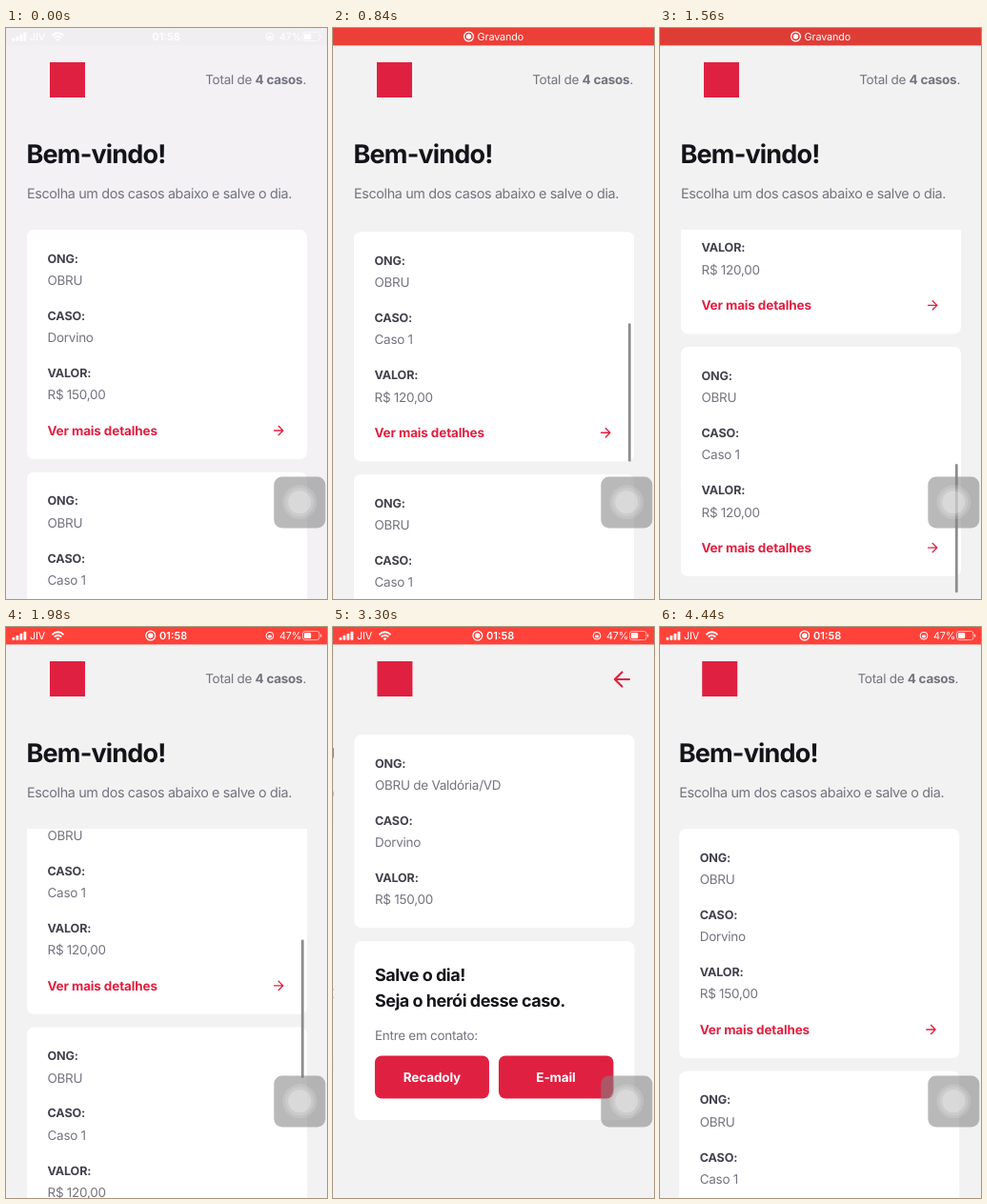
Animation of 337 by 600 pixels, one loop 4.5 s. Source, as an HTML page:

```html
<!DOCTYPE html>
<html lang="pt-BR">
<head>
<meta charset="utf-8">
<style>
  html, body { margin: 0; width: 100%; height: 100%; overflow: hidden; background: #f2f2f2; }
  svg { display: block; width: 100vw; height: 100vh; font-family: Inter, sans-serif; text-rendering: geometricPrecision; }
  text { letter-spacing: -.02em; fill: #737380; font-size: 13.5px; }
  .title { font-size: 27px; font-weight: 700; fill: #13131a; letter-spacing: -.03em; }
  .lead { font-size: 14.4px; letter-spacing: -.026em; }
  .label { font-size: 12.6px; font-weight: 700; fill: #41414d; letter-spacing: -.012em; }
  .link { font-weight: 700; fill: #e02041; letter-spacing: -.01em; }
  .hero { font-size: 18px; font-weight: 700; fill: #13131a; letter-spacing: -.028em; }
  .button { font-weight: 700; fill: #fff; text-anchor: middle; letter-spacing: -.01em; }
  .status text { font-size: 10.8px; fill: #fff; letter-spacing: -.01em; }
  .status .clock { font-size: 11px; font-weight: 600; letter-spacing: 0; }
  .arrow { fill: none; stroke: #e02041; stroke-width: 2; stroke-linecap: round; stroke-linejoin: round; }
</style>
</head>
<body>
<svg id="stage" viewBox="0 0 337 600" preserveAspectRatio="none"></svg>
<script>
const LOOP = 4500, WIDTH = 337, PITCH = 254.7, VIEW_TOP = 212, VIEW_HEIGHT = 388;
const CONTENT = 4 * PITCH, MAX_SCROLL = CONTENT - VIEW_HEIGHT;
const PUSH = 2416, POP = 3903, RATE = 7.5 / 1000;
const RECORD_AT = 180, CLOCK_AT = 1900;

const SCROLL = [[0, 0], [380, 0], [540, 65.5], [1140, 444.2], [1560, 641],
                [1700, MAX_SCROLL], [1780, MAX_SCROLL], [2170, 0], [LOOP, 0]];
const BAR_FADE = [[380, 0], [430, 1], [2190, 1], [2290, 0]];
const LINK_FADE = [[2320, 1], [2370, .2], [2480, .2], [2600, 1]];
const BACK_FADE = [[3780, 1], [3830, .2], [3920, .2], [4040, 1]];

const text = (x, y, content, cls = '', extra = '') =>
  `<text x="${x}" y="${y}" class="${cls}" ${extra}>${content}</text>`;
const box = (x, y, w, h, fill, r = 0, extra = '') =>
  `<rect x="${x}" y="${y}" width="${w}" height="${h}" rx="${r}" fill="${fill}" ${extra}/>`;
const arrow = (x, y, size, id = '') =>
  `<path id="${id}" class="arrow" transform="translate(${x} ${y}) scale(${size / 24})" d="M-7 0H7M0 -7L7 0L0 7"/>`;
const logo = box(46, 36, 37, 37, '#e02041');

const fields = (y, ong, name, value) =>
  [['ONG:', ong], ['CASO:', name], ['VALOR:', value]].map(([label, content], i) =>
    text(43.5, y + 34.6 + i * 60.2, label, 'label') + text(43.5, y + 58 + i * 60.2, content)).join('');

const listCard = i => {
  const y = VIEW_TOP + i * PITCH;
  return box(22, y, 294, 241, '#fff', 7.2) +
    fields(y, 'OBRU', i ? 'Caso 1' : 'Dorvino', i ? 'R$ 120,00' : 'R$ 150,00') +
    `<g ${i ? '' : 'id="link"'}>${text(43.5, y + 216, 'Ver mais detalhes', 'link')}${arrow(286.2, y + 211, 16)}</g>`;
};

const listPage = `<g id="list">${logo}
  ${text(315, 58.8, 'Total de <tspan font-weight="700">4 casos</tspan>.', '', 'text-anchor="end"')}
  ${text(21.5, 141.5, 'Bem-vindo!', 'title')}
  ${text(22, 178.6, 'Escolha um dos casos abaixo e salve o dia.', 'lead')}
  <g clip-path="url(#viewport)"><g id="cards">${[0, 1, 2, 3].map(listCard).join('')}</g></g>
  ${box(309.9, 0, 2.8, 0, '#8e8e90', 1.4, 'id="thumb"')}</g>`;

const detailPage = `<g id="detail">
  ${box(-6, 0, 6, 600, 'url(#shade)', 0, 'id="edge"')}${box(0, 0, WIDTH, 600, '#f2f2f2')}${logo}
  <g transform="translate(303 55) scale(-1 1)">${arrow(0, 0, 26, 'back')}</g>
  ${box(22, 113.3, 294, 202.7, '#fff', 7.2)}
  ${fields(113, 'OBRU de Valdória/VD', 'Dorvino', 'R$ 150,00')}
  ${box(22, 330, 294, 188, '#fff', 7.2)}
  ${text(43.5, 372.3, 'Salve o dia!', 'hero')}${text(43.5, 399.3, 'Seja o herói desse caso.', 'hero')}
  ${text(43.5, 433.5, 'Entre em contato:')}
  ${box(43.5, 450.5, 120, 45, '#e02041', 7.2)}${text(103.5, 478, 'Recadoly', 'button')}
  ${box(173.5, 450.5, 120.5, 45, '#e02041', 7.2)}${text(233.5, 478, 'E-mail', 'button')}</g>`;

const recordIcon = x =>
  `<circle cx="${x}" cy="9" r="4.9" fill="none" stroke="#fff" stroke-width="1.2"/><circle cx="${x}" cy="9" r="2.7" fill="#fff"/>`;

const statusBar = `<g class="status">${box(0, 0, WIDTH, 18.4, '#f00', 0, 'id="bar"')}
  <g id="recording">${recordIcon(142.5)}${text(151.5, 13, 'Gravando')}</g>
  <g id="phone">
    ${[0, 1, 2, 3].map(i => box(6.5 + i * 4, 10.8 - i * 2, 2.8, 3 + i * 2, '#fff', .8)).join('')}
    ${text(25, 13, 'JIV')}
    <g fill="none" stroke="#fff" stroke-width="1.8"><path d="M48.5 8Q54.5 2.6 60.5 8M50.7 10.4Q54.5 7 58.3 10.4"/></g>
    <path d="M52.5 12L54.5 14L56.5 12Q54.5 10.4 52.5 12" fill="#fff"/>
    <g id="dot">${recordIcon(151.8)}</g>
    ${text(0, 13, '01:58', 'clock', 'id="clock"')}
    <g fill="none" stroke="#fff"><circle cx="277" cy="9.2" r="3.9"/></g>${box(275.2, 8.4, 3.6, 2.8, '#fff', .5)}
    ${text(287, 13, '47%')}
    ${box(311.5, 4.5, 17.5, 9, 'none', 2.5, 'stroke="#fff" stroke-opacity=".6"')}
    ${box(313, 6, 7.2, 6, '#fff', 1.2)}${box(330, 7.4, 1.3, 3.2, '#fff', .6, 'opacity=".7"')}
  </g></g>`;

const touchButton = box(281.3, 471.5, 54, 54, '#828282', 8.5, 'opacity=".56"') +
  [[18, .14], [15, .16], [12, .26]].map(([r, o]) =>
    `<circle cx="308.3" cy="498.3" r="${r}" fill="#fff" opacity="${o}"/>`).join('');

const stage = document.getElementById('stage');
stage.innerHTML = `<defs>
  <clipPath id="viewport">${box(0, VIEW_TOP, WIDTH, VIEW_HEIGHT, '#fff')}</clipPath>
  <linearGradient id="shade"><stop stop-opacity="0"/><stop offset="1" stop-opacity=".08"/></linearGradient>
</defs>${box(0, 0, WIDTH, 600, '#f2f2f2', 0, 'id="page"')}${listPage}${detailPage}${statusBar}${touchButton}`;

const el = id => document.getElementById(id);
const set = (id, attributes) => Object.entries(attributes).forEach(([k, v]) => el(id).setAttribute(k, v));
const show = (id, visible) => set(id, { display: visible ? 'inline' : 'none' });

function linear(keys, t) {
  if (t <= keys[0][0]) return keys[0][1];
  for (let i = 1; i < keys.length; i++) {
    const [t0, a] = keys[i - 1], [t1, b] = keys[i];
    if (t < t1) return a + (b - a) * (t - t0) / (t1 - t0);
  }
  return keys.at(-1)[1];
}

// Monotone cubic through the keys: flat where the direction changes.
function smooth(keys, t) {
  const slope = i => keys[i + 1] && keys[i] ? (keys[i + 1][1] - keys[i][1]) / (keys[i + 1][0] - keys[i][0]) : 0;
  const tangent = i => {
    const a = slope(i - 1), b = slope(i);
    return a * b > 0 ? 2 * a * b / (a + b) : 0;
  };
  const i = keys.findIndex((key, n) => n === keys.length - 2 || t < keys[n + 1][0]);
  const [t0, a] = keys[i], [t1, b] = keys[i + 1], d = t1 - t0, u = (t - t0) / d, v = 1 - u;
  return a * (1 + 2 * u) * v * v + b * u * u * (3 - 2 * u) + d * u * v * (tangent(i) * v - tangent(i + 1) * u);
}

function pushProgress(t) {
  if (t < PUSH) return 0;
  return t < POP ? 1 - Math.exp(-RATE * (t - PUSH)) : Math.exp(-RATE * (t - POP));
}

function draw(t) {
  const scroll = smooth(SCROLL, t), progress = pushProgress(t);
  set('cards', { transform: `translate(0 ${-scroll})` });
  // The thumb shrinks by the overscroll and stays pinned to the bottom.
  const height = 145.5 - Math.max(0, scroll - MAX_SCROLL);
  const y = Math.min(VIEW_TOP + 2 + scroll * VIEW_HEIGHT / CONTENT, 598 - height);
  set('thumb', { y, height, opacity: linear(BAR_FADE, t) });

  set('list', { transform: `translate(${-.3 * WIDTH * progress} 0)` });
  set('detail', { transform: `translate(${WIDTH * (1 - progress)} 0)` });
  set('edge', { opacity: progress });
  show('detail', progress > 0);
  set('link', { opacity: linear(LINK_FADE, t) });
  set('back', { opacity: linear(BACK_FADE, t) });

  const recording = t >= RECORD_AT, banner = recording && t < CLOCK_AT;
  const glow = banner ? .5 + .5 * Math.cos((t - 1140) / 1200 * 2 * Math.PI) : 1;
  set('page', { fill: recording ? '#f2f2f2' : '#f3f1f4' });
  set('bar', { fill: recording ? `rgb(${214 + 41 * glow}, ${60 + 6 * glow}, ${53 + 5 * glow})` : '#f1eef2' });
  show('recording', banner);
  show('phone', !banner);
  show('dot', recording);
  set('clock', { x: recording ? 161 : 153.5 });
}

function tick() {
  draw(performance.now() % LOOP);
  requestAnimationFrame(tick);
}
tick();
</script>
</body>
</html>
```
